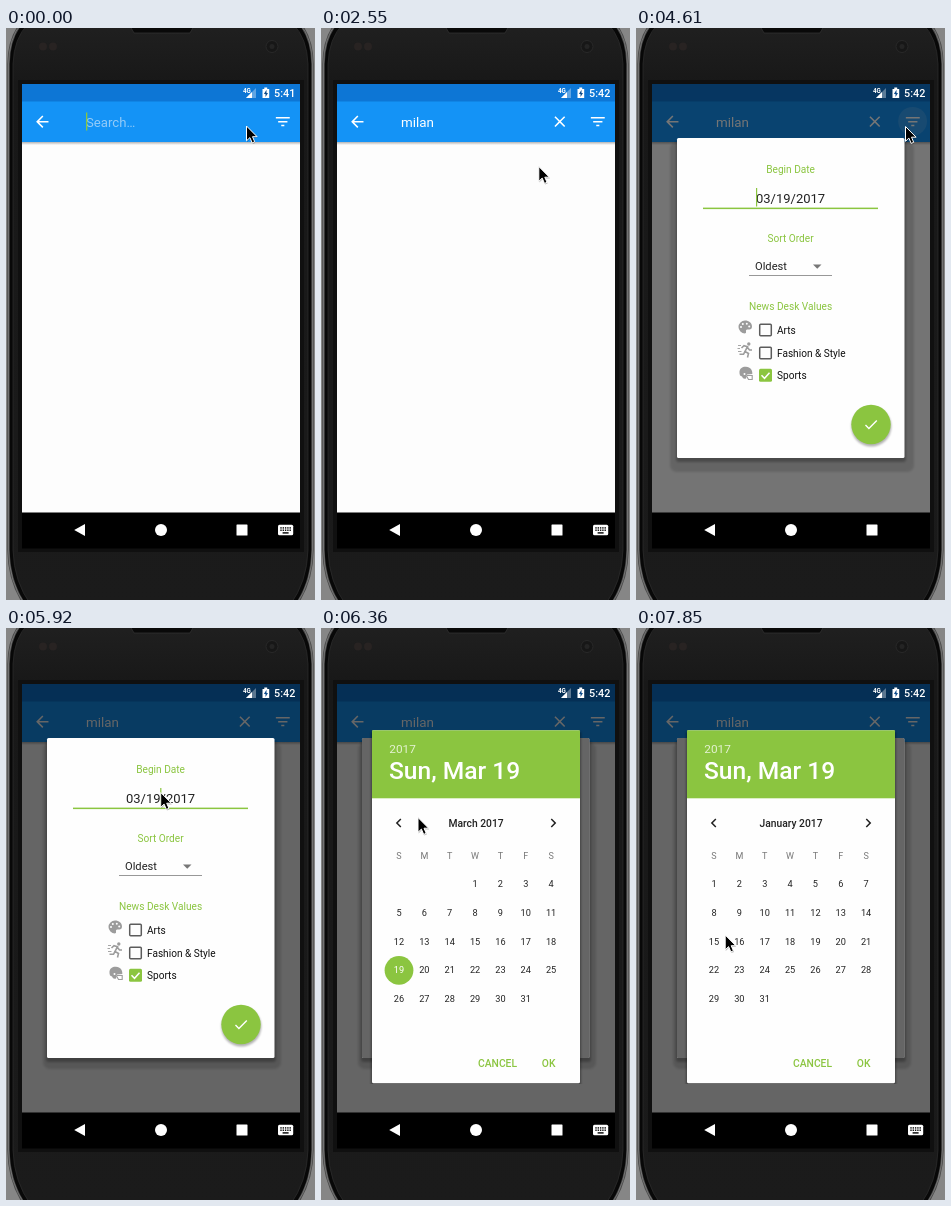
Recreate the animation shown at these times as an HTML page. Size 309x572 px, loop 8 s.

```html
<!DOCTYPE html>
<html lang="en">
<head>
<meta charset="utf-8">
<title>Search filter demo</title>
<style>
html, body { margin: 0; width: 100%; height: 100%; overflow: hidden; background: #888; }
svg { display: block; width: 309px; height: 572px; }
text { font-family: Roboto, sans-serif; white-space: pre; }
.mid { text-anchor: middle; }
.med { font-weight: 500; }
</style>
</head>
<body>
<svg id="stage" viewBox="0 0 309 572" xmlns="http://www.w3.org/2000/svg"></svg>
<script>
const LOOP = 8000;
const GREEN = '#8bc540';
const $ = id => document.getElementById(id);

const STEPS = [0, 450, 600, 1050, 1200, 1350, 1650, 1800, 2100, 2550, 2840,
  3290, 3440, 3590, 3730, 3880, 4030, 4320,
  4610, 4760, 4900, 5050, 5190, 5340, 5490, 5630, 5780, 5920,
  6220, 6360, 6510, 6660, 6810, 6960, 7250, 7400, 7550, 7700, 7850];

// Pointer path: time, x, y
const POINTER = [[0, 240.5, 98], [600, 217.8, 138.5], [2840, 217.8, 138.5],
  [3440, 260, 114], [3590, 290, 104], [4030, 269.5, 98.5], [4760, 269.5, 98.5],
  [5340, 178, 150], [5630, 154.7, 164.5], [5920, 154.7, 164.5], [6220, 122, 177],
  [6360, 97, 189.5], [6660, 78, 194], [7550, 78, 194], [7850, 89.2, 307]];
const DIM = [[4320, 0], [4610, .54], [4760, .6]];
const PAGES = [[6960, 0], [7250, .5], [7400, 1], [7550, 1.45], [7700, 1.92], [7850, 2]];
const TYPED = [[1200, 'm'], [1350, 'mi'], [1650, 'mil'], [1800, 'mila'], [2100, 'milan']];

function mix(keys, t, col = 1) {
  const i = keys.findIndex(k => k[0] > t);
  if (i === 0) return keys[0][col];
  if (i < 0) return keys[keys.length - 1][col];
  const a = keys[i - 1], b = keys[i];
  return a[col] + (b[col] - a[col]) * (t - a[0]) / (b[0] - a[0]);
}
const within = (t, a, b) => t >= a && t < b;

const rect = (x, y, w, h, fill, more = '') =>
  `<rect x="${x}" y="${y}" width="${w}" height="${h}" fill="${fill}" ${more}/>`;
const disc = (x, y, r, fill, more = '') =>
  `<circle cx="${x}" cy="${y}" r="${r}" fill="${fill}" ${more}/>`;
const text = (x, y, size, fill, str, more = '') =>
  `<text x="${x}" y="${y}" font-size="${size}" fill="${fill}" ${more}>${str}</text>`;
// Icon on a 24 unit grid, centred on x, y
const icon = (d, x, y, fill, s = .772) =>
  `<path d="${d}" fill="${fill}" transform="translate(${x} ${y}) scale(${s}) translate(-12 -12)"/>`;
const line = (d, color, w, more = '') =>
  `<path d="${d}" fill="none" stroke="${color}" stroke-width="${w}" ${more}/>`;

function phone() {
  const shell = 'M15 -4Q3 10 2.5 36V522Q3 554 19 577H290Q306 554 306.500 522V36Q306 10 294 -4Z';
  const inner = 'M22 -4Q8 10 7 36V522Q8 554 25 577H284Q301 554 302 522V36Q301 10 287 -4Z';
  return rect(0, 0, 309, 572, '#868686')
    + `<path d="${shell}" fill="#080808" stroke="#4a4a4a" stroke-width="2.500"/>`
    + line(shell, '#8f8f8f', .6)
    + `<path d="${inner}" fill="url(#body)" stroke="#2b2b2b" stroke-width=".8"/>`
    + rect(12, 52, 286, 472, '#101010')
    + `<path d="M124 -2H188L184 5H128Z" fill="#090909" stroke="#303030" stroke-width=".8"/>`
    + disc(37, 18.5, 4, '#282322') + disc(47, 18.500, 4, '#282322')
    + disc(266, 18.5, 6, '#171717', 'stroke="#292929"') + disc(266, 18.5, 2.5, '#242424');
}

function app() {
  return rect(16, 56, 278, 429, '#fdfdfd')
    + rect(16, 113, 278, 4, 'url(#drop)')
    + rect(16, 56, 278, 18, '#0d76d5') + rect(16, 73.5, 278, 40.5, '#1493f6')
    + icon('M20 11H7.830l5.590-5.590L12 4l-8 8 8 8 1.410-1.410L7.830 13H20z', 36.300, 93.700, '#fff')
    + text(80, 98.5, 13.2, '#93cbf8', 'Search…', 'id="hint"')
    + text(80, 98.5, 13.4, '#fff', '', 'id="query"')
    + rect(80, 84.5, 1.3, 18, GREEN, 'id="caret"')
    + `<g id="clear">${icon('M19 6.410L17.590 5 12 10.590 6.410 5 5 6.410 10.590 12 5 17.590 6.410 19 12 13.410 17.590 19 19 17.590 13.410 12z', 238.8, 93.6, '#fff')}</g>`
    + disc(276.6, 93.3, 14.4, '#fff', 'id="ripple" opacity=".14"')
    + icon('M10 18h4v-2h-4zM3 6v2h18V6zM6 13h12v-2H6z', 276.800, 93.700, '#fff')
    + rect(16, 56, 278, 429, '#000', 'id="dim"');
}

function bars() {
  let keys = '';
  for (let i = 0; i < 5; i++)
    for (let j = 0; j < 2; j++) keys += rect(274.3 + i * 2.3, 499.2 + j * 2.3, 1.4, 1.4, '#000');
  return text(237, 64.5, 6.3, '#fff', '4G', 'font-weight="700"')
    + '<path d="M250 60V70H240Z" fill="#fff" opacity=".35"/><path d="M246 64V70H240Z" fill="#fff"/>'
    + '<path d="M256.500 61H258.300V59.600H261.200V61H263.200V70H256.500Z" fill="#fff"/>'
    + '<path d="M260.500 61.800L257.900 65.900H259.500V69L262 64.900H260.500Z" fill="#0d4c8c"/>'
    + text(268, 69, 10.8, '#fff', '', 'id="clock" class="med"')
    + rect(16, 484.5, 278, 36, '#000')
    + '<path d="M68.200 502L79 496V508Z" fill="#fff"/>' + disc(155, 502, 6, '#fff')
    + rect(230.5, 496.5, 11, 11, '#fff', 'rx=".6"')
    + `<g id="keys">${rect(272, 496.7, 15.2, 10.6, '#fff', 'rx="1.5"')}${keys}${rect(276.6, 504.2, 6, 1.4, '#000')}</g>`;
}

function check(y, label, on) {
  const box = on
    ? rect(123, y - 6.5, 13, 13, GREEN, 'rx="1.5"') + line(`M125.500 ${y}l3 3l5 -5.500`, '#fff', 1.5)
    : rect(123.7, y - 5.8, 11.6, 11.6, 'none', 'rx="1" stroke="#5c5c5c" stroke-width="1.5"');
  return box + text(141, y + 3.7, 10.1, '#111', label);
}

function deskIcons() {
  const g = '#9c9c9c';
  const palette = '<path d="M109 292.500a6.500 6.500 0 0 0 0 13q1.500 -.3 1 -2q-.4 -1.800 1.200 -2h2q2.800 -.2 2.800 -3c0 -3.500 -3 -6 -7 -6Z" fill="' + g + '"/>'
    + [[105, 299], [106.8, 296], [110.8, 295.8], [113.2, 298.5]].map(p => disc(p[0], p[1], 1, '#fff')).join('');
  const runner = disc(112.8, 316, 1.7, g)
    + line('M105.500 320L108 317.700L111.500 318.700L109 323.500L112.500 325.500L111.500 329.500M109 323.500L107.500 326.300H103.500M111.500 319.500L113.500 322H116', g, 1.6)
    + line('M102 317.500h3M101.500 320.500h2.500M102 323.500h3.500', g, .9);
  const helmet = `<path d="M104 347.500C102 341 106 338.500 110 338.800C114.500 339 116.800 342.500 116.300 346L111 346.500L110 350.500Q107 351.500 106 348.500Z" fill="${g}"/>`
    + line('M111 347.500H116.200V351.500H112.500L110.500 348', g, 1.1) + disc(108.5, 346, 1, '#fff');
  return palette + runner + helmet;
}

function filterDialog() {
  const head = (y, s) => text(154.6, y, 10.15, GREEN, s, 'class="mid"');
  return rect(37, 114, 238, 327, '#000', 'id="halo" rx="7" opacity=".13" filter="url(#soft)"')
    + rect(40, 112, 230, 322, '#000', 'rx="3" opacity=".25" filter="url(#soft)"')
    + rect(41, 110, 227.5, 320, '#fefefe', 'rx="1.5"')
    + head(144.5, 'Begin Date') + head(214, 'Sort Order') + head(282, 'News Desk Values')
    + text(154.6, 174.6, 13, '#222', '03/19/2017', 'class="mid"')
    + rect(67, 179.6, 175, 1.5, GREEN) + rect(120, 160, 1.2, 18.5, GREEN, 'id="dateCaret"')
    + text(119, 242.2, 11.15, '#222', 'Oldest')
    + '<path d="M177 236.500H185.500L181.250 240.700Z" fill="#777"/>' + rect(113, 247, 83, .9, '#8d8d8d')
    + check(302, 'Arts') + check(325, 'Fashion &amp; Style') + check(347.3, 'Sports', true)
    + deskIcons()
    + disc(235.3, 398.5, 20, '#000', 'opacity=".3" filter="url(#soft)"') + disc(235, 396.5, 19.7, GREEN)
    + icon('M9 16.170L4.830 12l-1.420 1.410L9 19 21 7l-1.410-1.410z', 235, 396.500, '#fff', .7)
    + rect(41, 110, 227.5, 320, '#000', 'id="dim2" rx="1.5"');
}

const dayX = i => 78 + i * 25.35;

function month(name, first, count, picked, offset) {
  let s = text(155 + offset, 198.6, 10.3, '#222', name + ' 2017', 'class="mid med"');
  [...'SMTWTFS'].forEach((c, i) => { s += text(dayX(i) + offset, 231.2, 9, '#777', c, 'class="mid"'); });
  for (let d = 1; d <= count; d++) {
    const n = first + d - 1, x = dayX(n % 7) + offset, y = 258.6 + Math.floor(n / 7) * 28.95;
    if (d === picked) s += disc(x, y - 3.1, 14.4, GREEN);
    s += text(x, y, 9.2, d === picked ? '#fff' : '#222', d, 'class="mid"');
  }
  return s;
}

function calendar() {
  return `<g clip-path="url(#around)">${rect(50, 104, 210, 354, '#000', 'opacity=".35" filter="url(#soft)"')}</g>`
    + rect(51, 102.3, 208, 353, '#fefefe', 'rx="1.5"') + rect(51, 102.3, 208, 68, GREEN)
    + text(68.3, 125, 11.8, '#e3f1d0', '2017')
    + text(68, 151, 24.6, '#fff', 'Sun, Mar 19', 'class="med"')
    + `<g clip-path="url(#pane)"><g id="pager">${month('March', 3, 31, 19, 0)}${month('February', 3, 28, 0, -208)}${month('January', 0, 31, 0, -416)}</g></g>`
    + icon('M15.410 7.410L14 6l-6 6 6 6 1.410-1.410L10.830 12z', 77.800, 195, '#222', .75)
    + icon('M8.590 16.590L10 18l6-6-6-6-1.410 1.410L13.170 12z', 232.300, 195, '#222', .75)
    + text(157, 439, 10.3, GREEN, 'CANCEL', 'class="med"') + text(220.8, 439, 10.3, GREEN, 'OK', 'class="med"');
}

$('stage').innerHTML = `<defs>
  <linearGradient id="body" x1="0" x2="0" y1="0" y2="1"><stop offset="0" stop-color="#202020"/><stop offset=".1" stop-color="#181818"/><stop offset="1" stop-color="#1b1b1b"/></linearGradient>
  <linearGradient id="drop" x1="0" x2="0" y1="0" y2="1"><stop offset="0" stop-color="#9a9a9a"/><stop offset="1" stop-color="#fdfdfd"/></linearGradient>
  <filter id="soft"><feGaussianBlur stdDeviation="1.200"/></filter>
  <clipPath id="pane">${rect(51, 171, 208, 220, '#000')}</clipPath>
  <clipPath id="around">${rect(41, 102, 228, 354, '#000')}</clipPath>
</defs>` + phone() + app() + bars()
  + `<g id="filter">${filterDialog()}</g><g id="calendar">${calendar()}</g>`
  + `<g id="pointer"><path d="M.5 1.500V16L4 12.800L6.300 18L8.900 16.900L6.600 12H11.200Z" fill="#000" opacity=".25"/>
  <path d="M0 0V14.800L3.400 11.600L5.700 16.900L8.200 15.800L6 10.700H10.600Z" fill="#000" stroke="#fff" stroke-width="1"/></g>`;

const show = (id, on) => $(id).setAttribute('visibility', on ? 'visible' : 'hidden');

function draw(time) {
  const t = STEPS.filter(s => s <= time).pop();
  const typed = TYPED.filter(k => k[0] <= t).pop();

  $('clock').textContent = t < 450 ? '5:41' : '5:42';
  $('query').textContent = typed ? typed[1] : '';
  show('hint', !typed);
  show('clear', typed);
  show('caret', t < 450 || within(t, 1050, 2550));
  $('caret').setAttribute('x', typed ? 80 + $('query').getComputedTextLength() : 80);
  show('ripple', within(t, 2840, 4320) || within(t, 4610, 4900));
  show('keys', t < 2840 || t >= 5920);

  $('dim').setAttribute('opacity', mix(DIM, t));
  show('filter', t >= 4610);
  const grow = t < 4760 ? 3 : 0;
  $('halo').setAttribute('x', 37 - grow);
  $('halo').setAttribute('width', 238 + 2 * grow);
  $('halo').setAttribute('height', 327 + grow);
  show('dateCaret', within(t, 4610, 5050) || within(t, 5490, 6220));
  $('dateCaret').setAttribute('x', t < 5780 ? 120 : 154.2);

  $('dim2').setAttribute('opacity', t < 6220 ? 0 : t < 6360 ? .35 : .6);
  show('calendar', t >= 6220);
  $('calendar').setAttribute('opacity', t < 6360 ? .6 : 1);
  $('pager').setAttribute('transform', `translate(${mix(PAGES, t) * 208} 0)`);
  $('pointer').setAttribute('transform', `translate(${mix(POINTER, t)} ${mix(POINTER, t, 2)})`);
}

const start = performance.now();
function tick(now) {
  draw(Math.max(0, now - start) % LOOP);
  requestAnimationFrame(tick);
}
draw(0);
requestAnimationFrame(tick);
</script>
</body>
</html>
```
